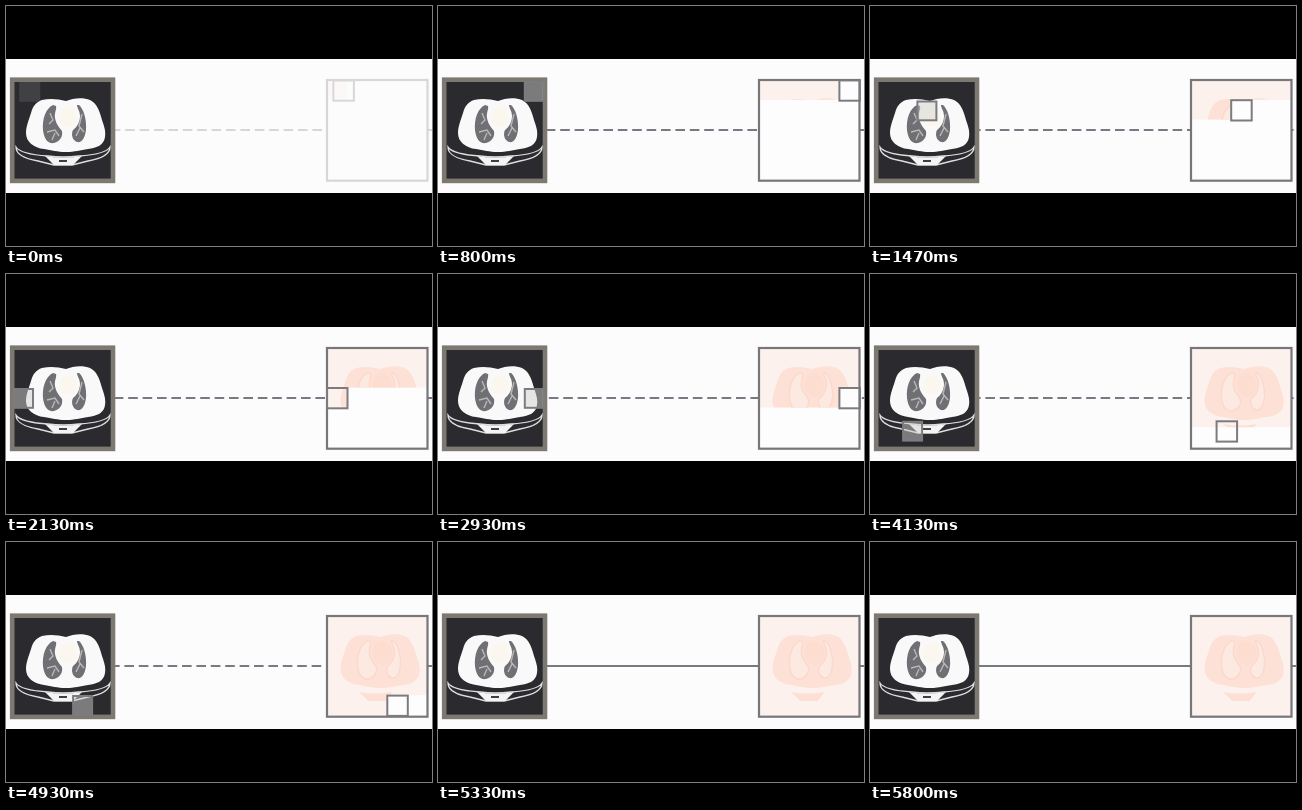
An HTML page for the animation above (5870 ms loop, 426x240 px).

```html
<!DOCTYPE html>
<html lang="en">
<head>
<meta charset="utf-8">
<title>Sliding window over a scan</title>
<style>
  html, body { margin: 0; width: 100%; height: 100%; overflow: hidden; background: #000; }
  svg { display: block; width: 100vw; height: 100vh; }
</style>
</head>
<body>
<svg viewBox="0 0 426 240">
  <defs>
    <path id="body" d="M20 127C20 120 23 114 25 107C27 100 30 96 36 94C44 92 52 93 60 95C67 92 77 91 84 94C92 98 94 107 96 114C98 120 100 125 99 131C98 139 91 142 82 143C74 144 69 146 60 146C51 146 46 144 38 143C28 142 20 136 20 127Z"/>
    <path id="lungs" d="M47 99C40 102 36 113 37 124C38 133 42 138 48 137C54 135 57 131 56 125C53 121 50 118 49 112C48 107 51 103 50 100ZM73 99C77 102 81 113 80 124C79 132 76 137 71 136C66 134 65 128 67 124C71 121 74 116 74 110C74 105 71 102 71 99Z"/>
    <path id="table" d="M10 141C13 146 27 149 42 150Q57 152 73 150C88 149 101 146 104 141C104 149 93 153 82 155L66 159H48L32 155C20 153 10 149 10 141Z"/>
    <clipPath id="seen"><path id="seenCells"/></clipPath>
  </defs>
  <rect y="53" width="426" height="134" fill="#fcfcfd"/>

  <rect x="6.2" y="73.7" width="100.8" height="101.2" fill="#2b2b2f" stroke="#7d7970" stroke-width="4.6"/>
  <use href="#table" fill="#2b2b2f" stroke="#dedede" stroke-width="1.3"/>
  <path d="M39 150Q57 153 76 150L67 159H48Z" fill="#f4f4f4"/>
  <path d="M53 155H61" stroke="#2b2b2f" stroke-width="1.8"/>
  <use href="#body" fill="#f9f9f9"/>
  <use href="#lungs" fill="#707074"/>
  <path d="M44 107L47 114L43 118M41 126L49 124L53 130M46 134L49 127M76 108L73 120L78 126M70 130L74 122" fill="none" stroke="#b8b8b8" stroke-width="1.4"/>
  <ellipse cx="62" cy="111" rx="9" ry="10" fill="#fcf7ee"/>

  <g id="overlay">
    <path id="link" d="M109 124H320M422 124H426" fill="none" stroke="#777983" stroke-width="2.2"/>
    <rect x="321" y="74" width="100.5" height="100.7" fill="#fdfdfd"/>
    <g clip-path="url(#seen)">
      <rect x="321" y="74" width="101" height="101" fill="#fcf1ec"/>
      <g transform="translate(314.5 0)">
        <use href="#body" fill="#fde1d6"/>
        <use href="#lungs" fill="#fce9e1" stroke="#fdd8cc" stroke-width="1.5"/>
        <ellipse cx="62" cy="111" rx="10" ry="12" fill="#fdddd0"/>
        <path d="M39 150Q56 153 72 150L65 159H48Z" fill="#fddfd5"/>
      </g>
    </g>
    <rect x="321" y="74" width="100.5" height="100.7" fill="none" stroke="#77777b" stroke-width="2.2"/>
    <g id="windows" stroke="#7c7c80" stroke-width="2">
      <rect id="scanWindow" width="19" height="18.8" fill="#d0d1ca" fill-opacity=".48"/>
      <rect id="mapWindow" width="20.5" height="20.3" fill="none"/>
    </g>
  </g>
</svg>
<script>
  const LOOP = 5870, CELL_TIME = 216, START = 0.35, SIDE = 5, LAST = SIDE * SIDE - 1;
  const DASH = 9.6, DASH_PERIOD = 14.4, DASH_TIME = 190;
  const el = id => document.getElementById(id);
  const clamp = v => Math.max(0, Math.min(1, v));
  const mix = (a, b, p) => a + (b - a) * p;
  const cell = k => [k % SIDE, Math.floor(k / SIDE)];

  function place(id, x, y) {
    el(id).setAttribute('x', x);
    el(id).setAttribute('y', y);
  }

  // Full rows plus the completed part of the current row.
  function seenPath(count) {
    const [col, row] = cell(count);
    const y = 74 + row * 19.8;
    let d = `M321 74H422V${row === SIDE ? 175 : y}H321Z`;
    if (col) d += `M321 ${y}h${col * 20.1}v${row === SIDE - 1 ? 22 : 19.8}H321Z`;
    return d;
  }

  function draw(t) {
    const u = t / CELL_TIME + START;
    const k = Math.min(LAST, Math.floor(u));
    const p = clamp((u - k - 0.25) / 0.33);
    const from = cell(k), to = cell(Math.min(LAST, k + 1));
    const col = mix(from[0], to[0], p), row = mix(from[1], to[1], p);
    const done = u >= LAST + 1;

    place('scanWindow', 8 + col * 19.7, 76 + row * 19.5);
    place('mapWindow', 321 + col * 20.1, 74.4 + row * 19.8);
    el('windows').style.display = done ? 'none' : '';
    el('seenCells').setAttribute('d', seenPath(done ? LAST + 1 : Math.max(0, Math.floor(u + 0.81))));

    const link = el('link');
    link.setAttribute('stroke-dasharray', done ? 'none' : `${DASH} ${DASH_PERIOD - DASH}`);
    link.setAttribute('stroke-dashoffset', 4.3 - DASH_PERIOD * (t / DASH_TIME % 1));
    el('overlay').setAttribute('opacity', mix(0.27, 1, clamp(t / 270)));
  }

  const begin = performance.now();
  function tick() {
    draw((performance.now() - begin) % LOOP);
    requestAnimationFrame(tick);
  }
  tick();
</script>
</body>
</html>
```
